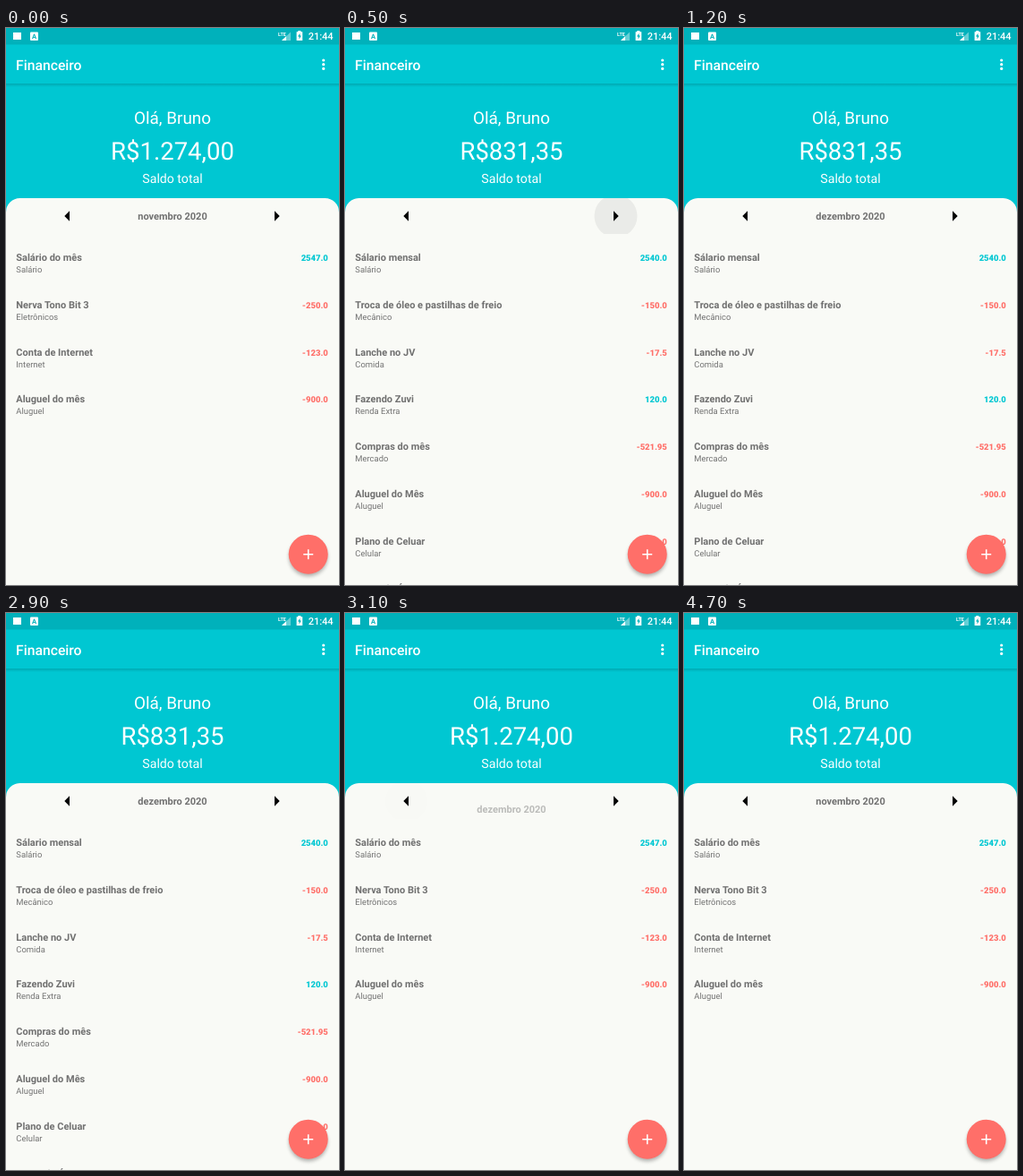
Animation of 372x622 px, one loop 5.3 s. Source, as an HTML page:

```html
<!DOCTYPE html>
<html lang="pt-BR">
<head>
<meta charset="utf-8">
<style>
  html, body { margin: 0; width: 100%; height: 100%; overflow: hidden; background: #f9faf6; }
  svg { display: block; width: 372px; height: 622px; font-family: Roboto, sans-serif; text-rendering: geometricPrecision; }
  .mid { text-anchor: middle; }
  .white { fill: #fff; }
  .bold { font-weight: 700; font-size: 11px; fill: #707070; }
  .sub { font-size: 9.43px; fill: #737373; }
  .sum { font-weight: 900; font-size: 9.43px; text-anchor: end; }
</style>
</head>
<body>
<svg viewBox="0 0 372 622">
  <defs>
    <linearGradient id="shade" x2="0" y2="1">
      <stop stop-color="#000" stop-opacity=".15"/>
      <stop offset="1" stop-color="#000" stop-opacity="0"/>
    </linearGradient>
    <filter id="blur" x="-30%" y="-30%" width="160%" height="160%"><feGaussianBlur stdDeviation="2.2"/></filter>
    <clipPath id="bar"><path d="M0 190h372v40H0z"/></clipPath>
  </defs>

  <path fill="#00c7d2" d="M0 0h372v210H0z"/>
  <path fill="#00b1bb" d="M0 0h372v18.5H0z"/>
  <path fill="url(#shade)" d="M0 62h372v4H0z"/>

  <g class="white">
    <path d="M8 5h9v8H8z"/>
    <rect x="27" y="4.5" width="9" height="9.5" rx="1"/>
    <text x="31.5" y="12" class="mid" font-size="7.5" font-weight="700" fill="#00b1bb">A</text>
    <path opacity=".4" d="M318 4.5v9.5h-10z"/>
    <path d="M313 9.25v4.75h-5z"/>
    <text x="304" y="9" font-size="5.5" font-weight="700">LTE</text>
    <path d="M326.3 3h3v1.2h1.9v9.8h-6.600V4.2h1.7z"/>
    <path fill="#00b1bb" d="M328.4 5.8v2.7h1.5l-2.4 4v-2.9h-1.5z"/>
    <text x="337.7" y="13" font-size="11" font-weight="500">21:44</text>
    <text x="11" y="47" font-size="15.72" font-weight="500">Financeiro</text>
    <circle cx="354.7" cy="36" r="1.6"/>
    <circle cx="354.7" cy="40.7" r="1.6"/>
    <circle cx="354.7" cy="45.4" r="1.6"/>
    <g class="mid">
      <text x="186" y="107" font-size="18.86">Olá, Bruno</text>
      <text id="total" x="186" y="147" font-size="27.5"></text>
      <text x="186" y="173" font-size="14.15">Saldo total</text>
    </g>
  </g>

  <path fill="#f9faf6" d="M0 622V205.700a15.700 15.700 0 0 1 15.700-15.700h340.600a15.700 15.700 0 0 1 15.700 15.700V622z"/>
  <g clip-path="url(#bar)">
    <circle id="ripple" cy="210" r="24"/>
    <text id="month" x="186" class="bold mid"></text>
  </g>
  <path d="M71 204.300v11.400l-5.700-5.700zM300 204.300v11.400l5.700-5.700z"/>

  <g id="list"></g>

  <circle cx="337.700" cy="590.700" r="21.500" opacity=".3" filter="url(#blur)"/>
  <circle cx="337.700" cy="587.700" r="22" fill="#ff6f69"/>
  <path d="M332.200 587.700h11M337.700 582.200v11" stroke="#fff" stroke-width="1.570"/>
</svg>
<script>
const LOOP = 5300, STEP = 100, FADE = 100, SHIFT = 15.7, ROW = 52.83;
const $ = id => document.getElementById(id);

const nov = {
  month: "novembro 2020", total: "R$1.274,00",
  rows: [
    ["Salário do mês", "Salário", "2547.0"],
    ["Nerva Tono Bit 3", "Eletrônicos", "-250.0"],
    ["Conta de Internet", "Internet", "-123.0"],
    ["Aluguel do mês", "Aluguel", "-900.0"]
  ]
};
const dec = {
  month: "dezembro 2020", total: "R$831,35",
  rows: [
    ["Sálario mensal", "Salário", "2540.0"],
    ["Troca de óleo e pastilhas de freio", "Mecânico", "-150.0"],
    ["Lanche no JV", "Comida", "-17.5"],
    ["Fazendo Zuvi", "Renda Extra", "120.0"],
    ["Compras do mês", "Mercado", "-521.95"],
    ["Aluguel do Mês", "Aluguel", "-900.0"],
    ["Plano de Celuar", "Celular", "-50.0"],
    ["Conta de Água", "Água", "-60.0"]
  ]
};
// dir 1: next month, title moves up; dir -1: previous month, title moves down
const taps = [
  { at: 400, from: nov, to: dec, dir: 1, x: 302.5 },
  { at: 3082, from: dec, to: nov, dir: -1, x: 68.5 }
];

const clamp = v => Math.max(0, Math.min(1, v));
const ease = v => 1 - (1 - clamp(v)) ** 4;

function rowMarkup([name, kind, sum], i) {
  const y = Math.round(259.9 + i * ROW);
  const color = sum[0] === "-" ? "#ff6f69" : "#00c7d2";
  return `<text x="11.3" y="${y}" class="bold">${name}</text>
    <text x="11.3" y="${y + 13}" class="sub">${kind}</text>
    <text x="359.800" y="${y}" class="sum" fill="${color}">${sum}</text>`;
}

let shown;
function showPage(page) {
  if (page === shown) return;
  shown = page;
  $("total").textContent = page.total;
  $("list").innerHTML = page.rows.map(rowMarkup).join("");
}

function draw(t) {
  const tap = taps.findLast(p => t >= p.at);
  const age = tap ? t - tap.at : LOOP;
  const { from, to, dir, x } = tap || taps[1];
  showPage(to);

  const leaving = age <= FADE;
  const p = ease(leaving ? age / FADE : age / FADE - 1);
  const month = $("month");
  month.textContent = (leaving ? from : to).month;
  month.setAttribute("y", 214 + dir * SHIFT * (leaving ? -p : 1 - p));
  month.setAttribute("opacity", leaving ? 1 - p : p);

  $("ripple").setAttribute("cx", x);
  $("ripple").setAttribute("opacity", 0.06 * clamp(age / 90) ** 2 * clamp((360 - age) / 250));
}

const start = performance.now();
function tick() {
  const t = (performance.now() - start) % LOOP;
  draw(Math.floor(t / STEP) * STEP); // the screen refreshes ten times a second
  requestAnimationFrame(tick);
}
tick();
</script>
</body>
</html>
```
